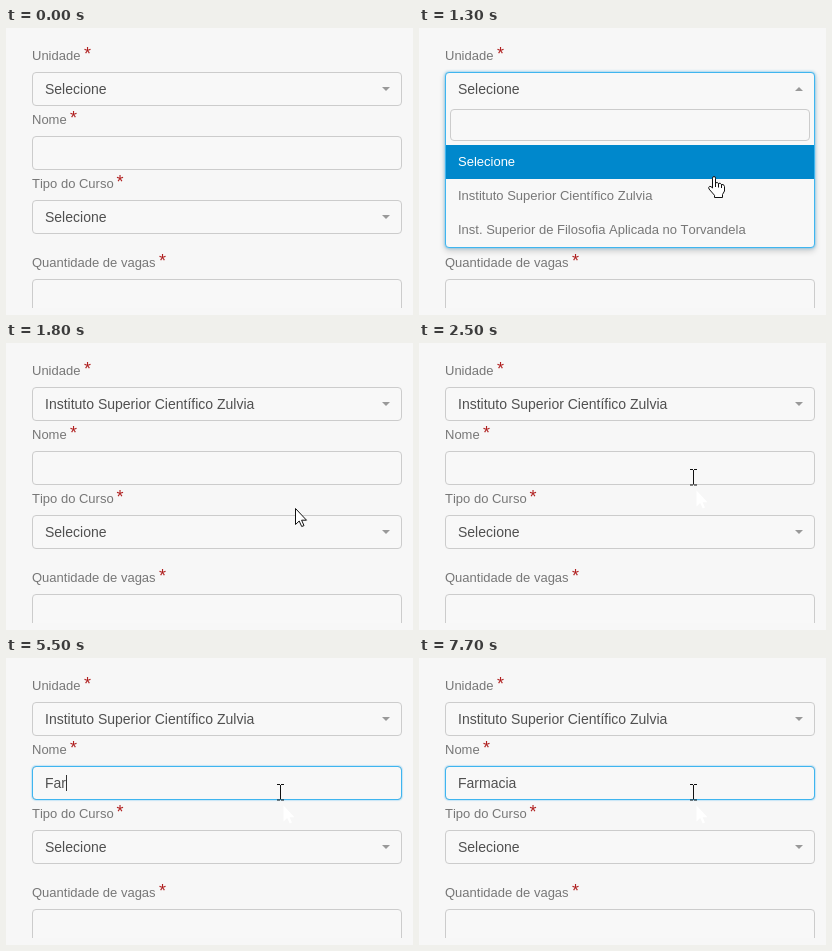
Write an HTML page that moves like this. It is 407 px wide and 287 px high and loops after 8000 ms.

```html
<!DOCTYPE html>
<html lang="pt">
<head>
<meta charset="utf-8">
<title>Formulário de curso</title>
<style>
html, body { margin: 0; width: 100%; height: 100%; overflow: hidden; background: #f7f7f7; }
body { font-family: "Liberation Sans", Arial, sans-serif; font-kerning: none; }
#form { position: absolute; left: 0; top: 0; width: 407px; height: 280px; overflow: hidden; }
#form div, svg { position: absolute; box-sizing: border-box; }
.text { white-space: pre; line-height: normal; }
.box { border: 1px solid #ccc; border-radius: 4px; background: #f8f8f8; }
.ring { border: 1px solid #3fb5ef; border-radius: 4px; box-shadow: 0 0 3px rgba(50, 175, 240, .75); }
.thin { box-shadow: 0 0 1px 1px rgba(90, 190, 245, .3); }
.arrow { width: 0; height: 0; border: 4px solid transparent; border-top-color: #999; border-bottom-width: 0; }
.arrow.up { border-width: 0 4px 4px; border-bottom-color: #999; }
.panel { border: 1px solid #3fb5ef; border-radius: 4px; background: #f8f8f8;
  box-shadow: 0 0 3px rgba(50, 175, 240, .75), 0 3px 6px rgba(0, 0, 0, .18); }
.caret { display: inline-block; width: 1px; height: 16px; background: #333; vertical-align: top; }
svg { left: 0; top: 0; overflow: visible; }
</style>
</head>
<body>
<div id="form"></div>
<svg width="407" height="287">
  <defs>
    <path id="arrowShape" d="M.5 .5V16.5L4.2 13 6.7 18.5 9 17.6 6.6 12.2H11.5Z"/>
  </defs>
  <use id="trail" href="#arrowShape" x="277" y="147" fill="#fff"/>
  <g id="hand" fill="#fff" stroke="#111" stroke-linejoin="round">
    <path d="M4.5 12V2.2Q4.5 .5 6 .5T7.5 2.2V7Q9.4 5.6 10.4 7.5 12.4 6.4 13.3 8.5 16 7.8 16.5 10.5V15L14.5 18.5V21.5H6.5V19.3L1 13Q.2 11 1.5 10.4 3 10 4.5 12Z"/>
    <path d="M7.5 7V11M10.5 7.5V11.5M13.5 8.5V12" fill="none"/>
  </g>
  <use id="pointer" href="#arrowShape" fill="#fff" stroke="#111"/>
  <path id="beam" d="M0 .5H3M4 .5H7M3.5 1V15.5M0 16H3M4 16H7" fill="none" stroke="#111"/>
</svg>
<script>
const LOOP = 8000, STEP = 100;
const OPEN = 700, HOVER = 1400, CLOSE = 1600, FOCUS = 2800;
const WORD = "Farmacia";
const KEYS = [4200, 4700, 5500, 5800, 6000, 6700, 7000, 7200];
const UNITS = ["Selecione", "Instituto Superior Científico Zulvia",
  "Inst. Superior de Filosofia Aplicada no Torvandela"];
// start, end, cursor, from x y, to x y
const MOVES = [
  [200, 500, "hand", 364, 58, 328, 69],
  [700, 1400, "hand", 328, 69, 287, 153],
  [1500, 1600, "hand", 283, 165, 283, 165],
  [1600, 1700, "pointer", 289, 165, 289, 165],
  [2000, 2400, "pointer", 289, 165, 277, 147],
  [2500, 2600, "beam", 271, 126, 271, 126]
];

const $ = id => document.getElementById(id);
const form = $("form");

function add(cls, x, y, w, h, parent = form) {
  const el = document.createElement("div");
  el.className = cls;
  el.style.cssText = `left:${x}px;top:${y}px;` + (w ? `width:${w}px;height:${h}px;` : "");
  return parent.appendChild(el);
}
function text(str, x, baseline, size, color, parent) {
  const el = add("text", x, baseline - Math.round(size * .905), 0, 0, parent);
  el.style.fontSize = size + "px";
  el.style.color = color;
  el.textContent = str;
  return el;
}
function label(str, baseline, starX) {
  text(str, 26, baseline, 13, "#777");
  text("*", starX, baseline, 18, "#b02020");
}
const field = y => add("box", 26, y, 370, 34);
function select(y) {
  field(y);
  add("arrow", 376, y + 15);
  return text(UNITS[0], 39, y + 22, 14, "#505050");
}
function caretAt(parent) {
  const el = document.createElement("span");
  el.className = "caret";
  return parent.appendChild(el);
}
const show = (el, on) => { el.style.visibility = on ? "inherit" : "hidden"; };

label("Unidade", 32, 78);
const unit = select(44);
label("Nome", 96, 64);
field(108);
label("Tipo do Curso", 160, 110.5);
select(172);
label("Quantidade de vagas", 239, 153);
field(251);

const unitRing = add("ring", 26, 44, 370, 34);
const nameRing = add("ring thin", 26, 108, 370, 34);
const nameText = text("", 39, 130, 14, "#505050");
const typed = nameText.appendChild(document.createElement("span"));
const nameCaret = caretAt(nameText);

const menu = add("", 0, 0, 407, 280);
add("panel", 26, 44, 370, 176, menu);
text(UNITS[0], 39, 66, 14, "#505050", menu);
add("arrow up", 376, 59, 0, 0, menu);
add("box", 31, 81, 360, 32, menu);
const searchCaret = caretAt(text("", 36, 102, 14, "#333", menu));
const rows = UNITS.map((name, i) => {
  const bar = add("", 27, 117 + 34 * i, 368, 34, menu);
  return { bar, name: text(name, 39, 138 + 34 * i, 13, "#777", menu) };
});

const blink = age => age >= 0 && age % 1000 < 500;

function drawCursor(t) {
  const move = MOVES.filter(m => m[0] <= t).pop();
  for (const id of ["hand", "pointer", "beam"]) show($(id), move && move[2] === id);
  if (!move) return;
  const [start, end, kind, x0, y0, x1, y1] = move;
  const p = Math.min(1, (t - start) / (end - start));
  const e = p * p * (3 - 2 * p);
  const at = (a, b) => Math.round(a + (b - a) * e);
  $(kind).setAttribute("transform", `translate(${at(x0, x1)} ${at(y0, y1)})`);
}

function draw(time) {
  const t = Math.floor(time % LOOP / STEP) * STEP;

  show(menu, t >= OPEN && t < CLOSE);
  show(searchCaret, blink(t - OPEN));
  const active = t >= HOVER ? 1 : 0;
  rows.forEach((row, i) => {
    row.bar.style.background = i === active ? "#0088cc" : i ? "none" : "#f2f2f2";
    row.name.style.color = i === active ? "#fff" : i ? "#777" : "#222";
  });

  unit.textContent = UNITS[t >= CLOSE ? 1 : 0];
  unitRing.style.opacity = t < CLOSE ? 0 : Math.max(0, .7 - (t - CLOSE) / 250);

  nameRing.style.opacity = t < FOCUS ? 0 : t < FOCUS + STEP ? .5 : 1;
  const keys = KEYS.filter(k => k <= t);
  typed.textContent = WORD.slice(0, keys.length);
  show(nameCaret, blink(t - (keys.pop() || FOCUS)));

  show($("trail"), t >= 2500);
  drawCursor(t);
}

const begin = performance.now();
function tick() {
  draw(performance.now() - begin);
  requestAnimationFrame(tick);
}
tick();
</script>
</body>
</html>
```
